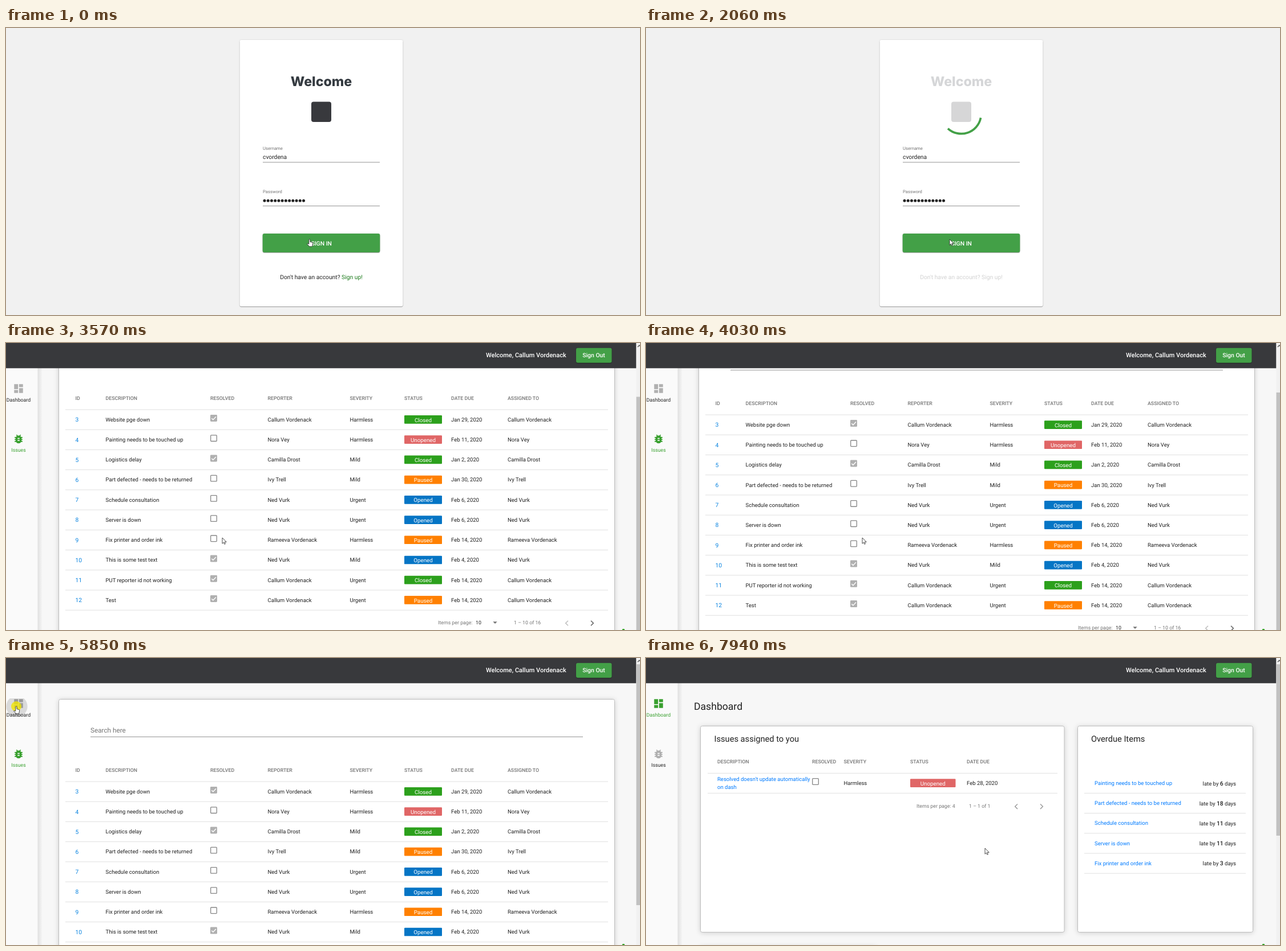
An HTML page for the animation above (8000 ms loop, 1111 by 504 pixels).

```html
<!DOCTYPE html>
<html lang="en">
<head>
<meta charset="utf-8">
<title>Issue tracker demo</title>
<style>
html, body { margin: 0; width: 100%; height: 100%; overflow: hidden; background: #f1f1f1; }
svg { display: block; width: 1111px; height: 504px; }
text { font-family: Roboto, Arial, sans-serif; white-space: pre; text-rendering: geometricPrecision; }
.card { filter: drop-shadow(0 1px 4px rgba(0,0,0,.16)); }
.raised { filter: drop-shadow(0 1.3px .5px rgba(0,0,0,.3)) drop-shadow(0 .6px 1.3px rgba(0,0,0,.14)); }
</style>
</head>
<body>
<svg id="stage" viewBox="0 0 1111 504" xmlns="http://www.w3.org/2000/svg"></svg>
<script>
const LOOP = 8000;
const GREEN = '#43a047', INK = '#212121', GREY = '#757575', LINK = '#007bff';
const BADGE = { Closed: '#2ca01c', Unopened: '#e06666', Paused: '#ff8000', Opened: '#0575c5' };

// ---------- drawing helpers ----------
const text = (x, y, str, size = 9.54, fill = INK, weight = 400, anchor = 'start') =>
  `<text x="${x}" y="${y}" font-size="${size}" fill="${fill}" font-weight="${weight}" text-anchor="${anchor}">${str}</text>`;
const rect = (x, y, w, h, fill, extra = '') =>
  `<rect x="${x}" y="${y}" width="${w}" height="${h}" fill="${fill}" ${extra}/>`;
const line = (x1, x2, y, stroke = '#e0e0e0') =>
  `<path d="M${x1} ${y}H${x2}" stroke="${stroke}" stroke-width="1"/>`;
const path = (d, extra) => `<path d="${d}" ${extra}/>`;
const group = (id, body, extra = '') => `<g id="${id}" ${extra}>${body}</g>`;
const card = (x, y, w, h) =>
  rect(x + .5, y + .5, w - 1, h - 1, '#fff', 'rx="3" stroke="#bdbdbd" stroke-width="1" class="card"');
const badge = (x, y, w, status) =>
  rect(x, y - 7.5, w, 14.7, BADGE[status], 'rx="1.2"') +
  text(x + w / 2, y + 4, status, 9.8, '#fff', 400, 'middle');
const checkbox = (x, y, on) => on
  ? rect(x, y - 6, 12, 12, '#b0b0b0', 'rx="1.4"') +
    path(`M${x + 2.3} ${y + .2}l2.6 2.6 5-5.3`, 'fill="none" stroke="#fff" stroke-width="1.4"')
  : rect(x + .7, y - 5.3, 10.6, 10.6, '#fff', 'rx="1" stroke="#858585" stroke-width="1.3"');
const chevron = (x, y, dir, color) =>
  path(`M${x - 2 * dir} ${y - 4.3}l${4.3 * dir} 4.3l${-4.3 * dir} 4.3`, `fill="none" stroke="${color}" stroke-width="1.5"`);

// ---------- login ----------
function loginPage() {
  const dots = Array.from({ length: 12 }, (_, i) =>
    `<circle cx="${453 + i * 6.23}" cy="303.3" r="2.5" fill="${INK}"/>`).join('');
  return rect(0, 0, 1111, 504, '#f1f1f1') +
    rect(409.5, 21, 286, 468, '#fff', 'rx="3" class="raised"') +
    group('heading',
      `<text x="552.5" y="102" text-anchor="middle" font-size="23.2" font-weight="800" fill="#343a40" style="font-family:Inter,sans-serif">Welcome</text>` +
      rect(535, 129.5, 35, 35.5, '#38393d', 'rx="4"')) +
    path('', 'id="spinner" fill="none" stroke="#43a047" stroke-width="3.7"') +
    text(450, 214, 'Username', 7.7, GREY) + text(450, 229.5, 'cvordena', 10.3) + line(450, 655, 235.8, '#949494') +
    text(450, 290, 'Password', 7.7, GREY) + dots + line(450, 655, 312.5, '#949494') +
    rect(449.7, 361, 205.6, 33, GREEN, 'rx="3" class="raised"') +
    `<g clip-path="url(#buttonClip)"><circle id="buttonRipple" cx="533" cy="371" fill="#fff"/></g>` +
    text(552.7, 381.5, 'SIGN IN', 10.4, '#fff', 500, 'middle') +
    group('signup', text(552.5, 440.5, `Don't have an account? <tspan id="signupLink">Sign up!</tspan>`, 10.3, INK, 400, 'middle'));
}

// ---------- issues ----------
const PEOPLE = ['Callum Vordenack', 'Nora Vey', 'Camilla Drost', 'Ivy Trell', 'Ned Vurk', 'Rameeva Vordenack'];
// description | resolved | person | severity | status | due
const ISSUES = `Website pge down|1|0|Harmless|Closed|Jan 29
Painting needs to be touched up|0|1|Harmless|Unopened|Feb 11
Logistics delay|1|2|Mild|Closed|Jan 2
Part defected - needs to be returned|0|3|Mild|Paused|Jan 30
Schedule consultation|0|4|Urgent|Opened|Feb 6
Server is down|0|4|Urgent|Opened|Feb 6
Fix printer and order ink|0|5|Harmless|Paused|Feb 14
This is some test text|1|4|Mild|Opened|Feb 4
PUT reporter id not working|1|0|Urgent|Closed|Feb 14
Test|1|0|Urgent|Paused|Feb 14`.split('\n').map(row => row.split('|'));

const headerRow = (y, cols) => cols.map(([x, name]) => text(x, y, name, 8.8, GREY, 500)).join('');

function issuesPage() {
  const rows = ISSUES.map(([what, done, who, severity, status, due], i) => {
    const y = 234.6 + i * 35.22, base = y + 3.2;
    return text(121.5, y + 3.7, i + 3, 10.3, '#0a84e0') + text(174.5, base, what) +
      checkbox(358, y - 2.6, done === '1') + text(458.5, base, PEOPLE[who]) + text(602.5, base, severity) +
      badge(698, y, 66, status) + text(780, base, due + ', 2020') + text(879, base, PEOPLE[who]) +
      line(104, 1055, y + 17.6);
  }).join('');
  const pager = text(757, 594, 'Items per page:', 8.8, GREY) + text(823, 594, '10', 8.8) +
    path('M853.3 589.2h7.4l-3.7 3.7z', 'fill="#757575"') + text(890, 594, '1 – 10 of 16', 8.8, GREY) +
    chevron(983, 592, -1, '#bdbdbd') + chevron(1027, 592, 1, '#616161');
  return group('shortCard', card(92, 72, 975, 160)) + group('fullCard', card(92, 72, 975, 553)) +
    text(148, 131.3, 'Search here', 11.75, GREY) + line(148, 1011, 138.5, '#949494') +
    group('table', headerRow(199.5, [[121.5, 'ID'], [174.5, 'DESCRIPTION'], [358, 'RESOLVED'], [458.5, 'REPORTER'],
      [602.5, 'SEVERITY'], [698, 'STATUS'], [780, 'DATE DUE'], [879, 'ASSIGNED TO']]) +
      line(104, 1055, 217) + rows + pager);
}

// ---------- dashboard ----------
const OVERDUE = [[1, 6], [3, 18], [4, 11], [5, 11], [6, 3]];

function dashboardPage() {
  const late = OVERDUE.map(([issue, days], i) => {
    const y = 220 + i * 35.2;
    return text(786, y + 3, ISSUES[issue][0], 9.54, LINK) +
      text(1034, y + 3.5, `late by <tspan font-weight="500" font-size="10.4">${days}</tspan> days`, 9.54, INK, 400, 'end') +
      line(768, 1051, y + 17.4);
  }).join('');
  return text(84, 90.5, 'Dashboard', 17.6) + card(95, 119, 638.5, 363) + card(756, 119, 308, 363) +
    card(95, 506, 309, 60) +
    text(119.5, 147.3, 'Issues assigned to you', 14.65) + text(780, 147.3, 'Overdue Items', 14.65) +
    group('dashData', headerRow(185, [[125, 'DESCRIPTION'], [291, 'RESOLVED'], [346.5, 'SEVERITY'], [463, 'STATUS'], [562, 'DATE DUE']]) +
      line(108, 721, 202.4) +
      text(125, 216, `Resolved doesn't update automatically`, 9.54, LINK) + text(125, 230, 'on dash', 9.54, LINK) +
      checkbox(291, 217, false) + text(346.5, 223, 'Harmless') + badge(463, 219.7, 79.5, 'Unopened') +
      text(562, 223, 'Feb 28, 2020') + line(108, 721, 237.4) +
      text(474, 263, 'Items per page: 4', 8.8, GREY) + text(566, 263, '1 – 1 of 1', 8.8, GREY) +
      chevron(649, 260.8, -1, '#9e9e9e') + chevron(693, 260.8, 1, '#9e9e9e') + late);
}

// ---------- frame around the pages ----------
const BUG = 'M20 8h-2.8c-.5-.8-1.1-1.5-1.8-2L17 4.4 15.6 3l-2.2 2.2a6 6 0 0 0-2.8 0L8.4 3 7 4.4l1.6 1.6c-.7.5-1.3 1.2-1.8 2H4v2h2.1L6 11v1H4v2h2v1l.1 1H4v2h2.8a6 6 0 0 0 10.4 0H20v-2h-2.1l.1-1v-1h2v-2h-2v-1l-.1-1H20zm-6 8h-4v-2h4zm0-4h-4v-2h4z';
const TILES = 'M3 13h8V3H3zm0 8h8v-6H3zm10 0h8V11h-8zm0-18v6h8V3z';
const icon = (id, d, y) => path(d, `id="${id}" transform="translate(11.7 ${y - 10.3}) scale(.86)"`);

function chrome() {
  return rect(55, 44, 9, 460, 'url(#edge)') + rect(0, 44, 55.5, 460, '#fafafa') +
    icon('dashIcon', TILES, 80) + text(22, 103.2, 'Dashboard', 8.75, INK, 400, 'middle').replace('<text', '<text id="dashLabel"') +
    icon('bugIcon', BUG, 168.5) + text(22, 191, 'Issues', 8.75, INK, 400, 'middle').replace('<text', '<text id="bugLabel"') +
    `<g clip-path="url(#navClip)"><circle id="navRipple" cx="19" cy="85" fill="#000"/></g>` +
    rect(0, 0, 1104.5, 44.3, '#38393c') +
    text(841, 25.2, 'Welcome, ' + PEOPLE[0], 11, '#fff', 500) +
    rect(999, 8.7, 62.5, 26, GREEN, 'rx="3" class="raised"') + text(1030, 25.2, 'Sign Out', 10.4, '#fff', 500, 'middle') +
    `<ellipse cx="1082" cy="504" rx="2.4" ry="2" fill="#2ca01c"/>` +
    rect(1104.5, 0, 7, 504, '#f1f1f1') + rect(1104.5, 0, 7, 0, '#c1c1c1', 'id="thumb"') +
    path('M1107 7l2.8-3 2.8 3', 'fill="none" stroke="#505050" stroke-width="1.2"');
}

const stage = document.getElementById('stage');
stage.innerHTML = `<defs>
  <clipPath id="buttonClip">${rect(450, 361, 205, 33, '#000', 'rx="3"')}</clipPath>
  <clipPath id="navClip">${rect(0, 71, 55, 36, '#000')}</clipPath>
  <linearGradient id="edge"><stop stop-color="#000" stop-opacity=".1"/><stop offset="1" stop-color="#000" stop-opacity="0"/></linearGradient>
</defs>` +
  group('app', rect(0, 0, 1111, 504, '#f7f7f7') + group('issues', issuesPage()) + group('dash', dashboardPage()) + chrome()) +
  group('login', loginPage()) +
  group('cursor', `<circle id="click" r="9" fill="#f2e600" opacity=".78"/>` +
    path('M0 0v10.3l2.3-2.2 1.5 3.3 1.7-.7-1.5-3.3h3.2z', 'id="arrow" fill="#fff" stroke="#222" stroke-width=".8"') +
    path('M-1.2 .9C-1.2-.4 1-.4 1 .9V4.6l3.4.8q1.5.4 1.3 1.9l-.7 3.6q-.3 1.9-1.6 1.9h-3.6L-4 8.8q-.5-1.5.9-1.4l1.9 1z',
      'id="hand" fill="#fff" stroke="#222" stroke-width=".8"'));

const el = {};
stage.querySelectorAll('[id]').forEach(node => el[node.id] = node);
const set = (id, attrs) => { for (const key in attrs) el[id].setAttribute(key, attrs[key]); };
const show = (id, on) => el[id].style.display = on ? '' : 'none';

// ---------- timing ----------
// The picture advances in bursts: [start, end, number of steps].
const BURSTS = [[710, 1200, 7], [1350, 2140, 11], [2210, 2210, 1], [2600, 3000, 6], [3320, 3570, 4], [3940, 4510, 8],
  [4650, 4800, 3], [5050, 5200, 3], [5370, 5600, 4], [5770, 6160, 6], [6310, 7090, 11], [7250, 7470, 4], [7800, 7940, 3]];

function stepTime(t) {
  const burst = BURSTS.filter(b => b[0] <= t).pop();
  if (!burst) return 0;
  const [start, end, steps] = burst;
  if (t >= end) return end;
  const gap = (end - start) / (steps - 1);
  return start + Math.floor((t - start) / gap + .12) * gap;
}

const clamp = v => Math.max(0, Math.min(1, v));
function track(keys, t) {
  let i = 0;
  while (i < keys.length - 2 && t > keys[i + 1][0]) i++;
  const [a, b] = [keys[i], keys[i + 1]];
  const u = clamp((t - a[0]) / (b[0] - a[0]));
  return a.slice(1).map((v, k) => v + (b[k + 1] - v) * u);
}

const POINTER = [[0, 532, 371], [2520, 532, 371], [2680, 290, 295], [2760, 196, 280], [2840, 222, 297], [3000, 379, 342],
  [4570, 379, 342], [4800, 78, 135], [4970, 78, 135], [5200, -20, 98], [5370, 13.5, 87], [5600, 18, 85],
  [6700, 18, 85], [7090, 324, 178], [7180, 324, 178], [7470, 515, 241], [7730, 515, 241], [7940, 594, 334]];
const SCROLL = [[3240, 0], [3320, 4.5], [3403, 45], [3487, 86], [3570, 100], [3860, 100], [3940, 98], [4021, 91],
  [4103, 75], [4184, 56], [4266, 38], [4347, 22], [4429, 8], [4510, 0]];

const ease = u => u * u * (3 - 2 * u);

// The head runs ahead for half a second, then the tail catches up, while the whole arc turns.
function spinnerPath(age) {
  const turn = Math.floor(age / 1000), phase = age % 1000;
  const grow = 270 * ease(clamp(phase / 500)), shrink = 270 * ease(clamp(phase / 500 - 1));
  const from = -117 + age * .18 + turn * 270 + shrink, sweep = 18 + grow - shrink;
  const point = deg => {
    const a = deg * Math.PI / 180;
    return `${552.5 + 34.7 * Math.cos(a)} ${151 + 34.7 * Math.sin(a)}`;
  };
  return `M${point(from)}A34.7 34.7 0 ${sweep > 180 ? 1 : 0} 1 ${point(from + sweep)}`;
}

function ripple(id, age, radius, strength) {
  const u = clamp((age + 40) / 400);
  set(id, { r: radius * (1 - (1 - u) ** 2), opacity: age < 0 ? 0 : strength * clamp((390 - age) / 230) });
}

function render(now) {
  const t = stepTime(now);
  const onLogin = t < 2139, busy = t > 860, onDash = t >= 6310;

  show('login', onLogin);
  show('app', !onLogin);
  set('heading', { opacity: busy ? .2 : 1 });
  set('signup', { opacity: busy ? .2 : 1 });
  set('signupLink', { fill: busy ? INK : '#1b7a1b' });
  show('spinner', busy);
  if (busy && onLogin) set('spinner', { d: spinnerPath(t - 850) });
  ripple('buttonRipple', t - 710, 140, .13);

  const loaded = t >= 2210, [scroll] = track(SCROLL, t);
  show('issues', !onDash);
  show('dash', onDash);
  show('table', loaded);
  show('fullCard', loaded);
  show('shortCard', !loaded);
  show('dashData', t > 6380);
  set('issues', { transform: `translate(0 ${-scroll})` });
  set('thumb', { y: 11 + scroll * .835, height: onDash ? 301 : loaded ? 423 : 0 });
  set('dashIcon', { fill: onDash ? '#39a02f' : '#b0b0b0' });
  set('dashLabel', { fill: onDash ? '#39a02f' : INK });
  set('bugIcon', { fill: onDash ? '#b0b0b0' : '#39a02f' });
  set('bugLabel', { fill: onDash ? INK : '#39a02f' });
  ripple('navRipple', t - 5770, 37, .13);

  const [x, y] = track(POINTER, t);
  const hand = !busy || (t >= 5370 && t < 6700);
  set('cursor', { transform: `translate(${x} ${y})` });
  show('hand', hand);
  show('arrow', !hand);
  show('click', (t >= 710 && t < 870) || (t >= 5770 && t < 5925));
}

const begin = performance.now();
(function tick() {
  render((performance.now() - begin) % LOOP);
  requestAnimationFrame(tick);
})();
</script>
</body>
</html>
```
